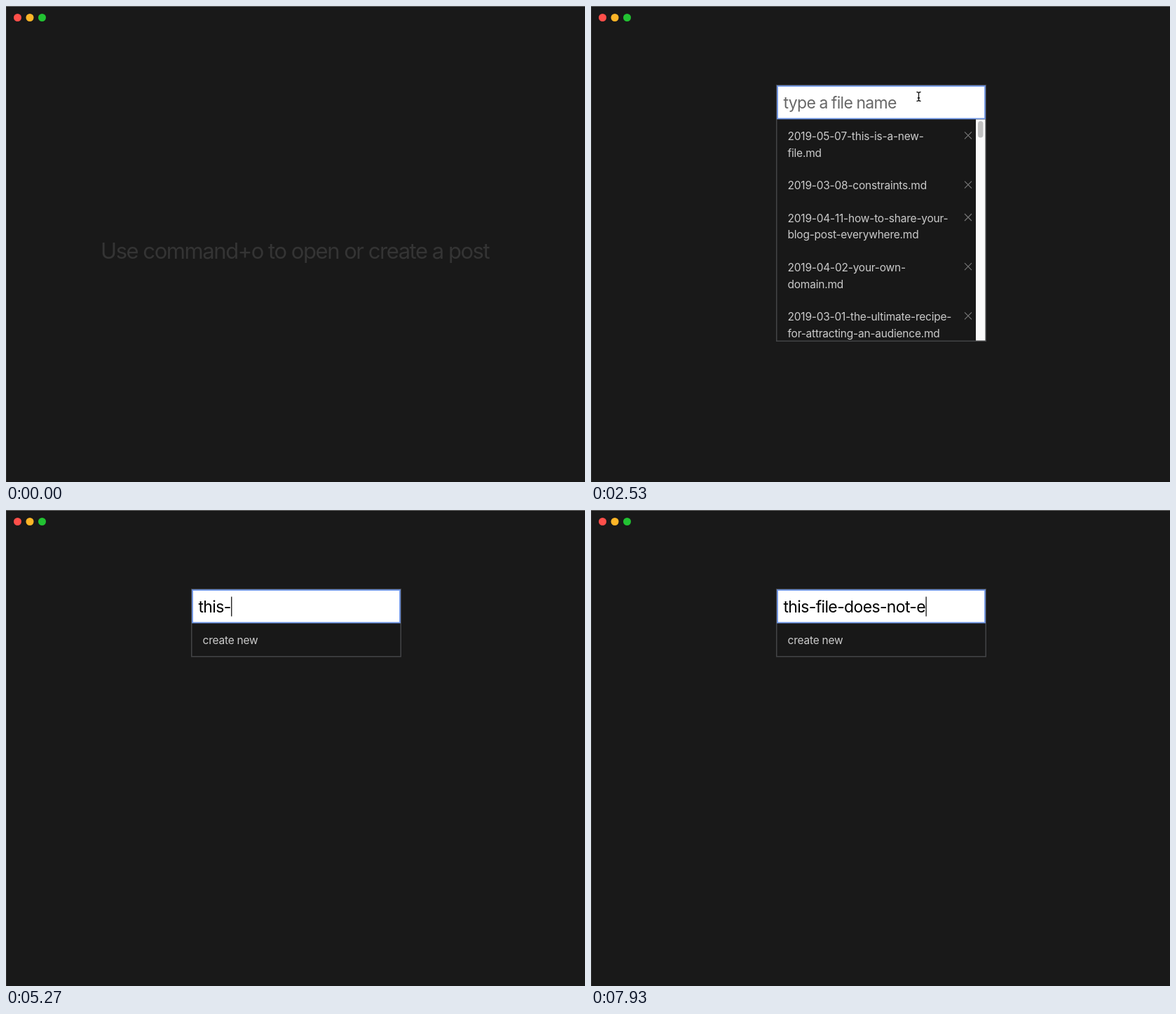
Write an HTML page that moves like this. It is 826 px wide and 678 px high and loops after 8000 ms.

```html
<!DOCTYPE html>
<html lang="en">
<head>
<meta charset="utf-8">
<title>Open or create a post</title>
<style>
  html, body { margin: 0; width: 100%; height: 100%; overflow: hidden; background: #191919; }
  svg { display: block; width: 826px; height: 678px; }
  text {
    font-family: Inter, "Noto Sans", sans-serif;
    font-optical-sizing: none;
    white-space: pre;
  }
  .hint { font-size: 31px; letter-spacing: -1.42px; word-spacing: -.2px; fill: #343434; }
  .field { font-size: 23px; letter-spacing: -.65px; word-spacing: -.7px; }
  .row { font-size: 15.5px; letter-spacing: -.22px; fill: #cbcbcb; }
  .close { stroke: #777; stroke-width: 1.1; fill: none; }
  [hidden] { display: none; }
</style>
</head>
<body>
<svg viewBox="0 0 826 678">
  <defs>
    <path id="x" d="M-5 -5L5 5M5 -5L-5 5"/>
    <path id="beam" d="M-3 -6.5Q0 -6.5 0 -4.5Q0 -6.5 3 -6.5M0 -5V5M-3 6.5Q0 6.5 0 4.5Q0 6.5 3 6.5M-1.7 2H1.7"/>
    <clipPath id="view"><rect x="265" y="161" width="298" height="315.5"/></clipPath>
  </defs>

  <rect width="826" height="678" fill="#191919"/>
  <rect width="1" height="678" fill="#303030"/>
  <rect width="826" height="1" fill="#686868"/>
  <circle cx="16.5" cy="16.5" r="5.5" fill="#ff4f4a"/>
  <circle cx="34" cy="16.5" r="5.5" fill="#fdb527"/>
  <circle cx="51.5" cy="16.5" r="5.5" fill="#22c232"/>

  <text id="hint" class="hint" x="135" y="360">Use command+o to open or create a post</text>

  <g id="dialog" hidden>
    <rect id="frame" x="264.75" y="112.75" width="298.5" height="364.5" fill="#181818" stroke="#434446" stroke-width="1.5"/>
    <rect x="266" y="114" width="296" height="46.5" fill="#fff" stroke="#6f96e6" stroke-width="1.8"/>
    <text id="field" class="field" x="274.5" y="146.3"></text>
    <rect id="caret" y="123.5" width="1.2" height="28"/>

    <g id="all" clip-path="url(#view)">
      <g id="rows"></g>
      <rect x="549" y="161.5" width="13.5" height="316" fill="#fafafa"/>
      <rect x="552" y="164" width="7.5" height="23.5" rx="3.75" fill="#c1c1c1"/>
    </g>
    <g id="match">
      <text class="row" x="280.5" y="191">2019-05-07-this-is-a-new-file.md</text>
      <use href="#x" class="close" x="551" y="184.5"/>
    </g>
    <text id="create" class="row" x="280.5" y="191">create new</text>
  </g>

  <g id="mouse" fill="none" hidden>
    <use href="#beam" stroke="#fff" stroke-width="3"/>
    <use href="#beam" stroke="#111" stroke-width="1.3"/>
  </g>
</svg>

<script>
(() => {
  const LOOP = 8000, OPEN = 1070, TYPE = 4000, CREATE = 4870;
  const $ = id => document.getElementById(id);
  const show = (id, on) => $(id).toggleAttribute('hidden', !on);

  // Time of each key press and the number of letters typed by then
  const fullName = 'this-file-does-not-e';
  const presses = [
    [4000, 1], [4070, 2], [4200, 3], [4400, 4], [4870, 5],
    [5470, 7], [5530, 9], [5670, 10], [6000, 11], [6130, 12],
    [6270, 13], [6400, 14], [6770, 15], [7270, 16], [7400, 17],
    [7530, 18], [7670, 19], [7870, 20]
  ];

  const files = [
    ['2019-05-07-this-is-a-new-', 'file.md'],
    ['2019-03-08-constraints.md'],
    ['2019-04-11-how-to-share-your-', 'blog-post-everywhere.md'],
    ['2019-04-02-your-own-', 'domain.md'],
    ['2019-03-01-the-ultimate-recipe-', 'for-attracting-an-audience.md']
  ];

  let baseline = 191, markup = '';
  for (const lines of files) {
    lines.forEach((line, i) => {
      markup += `<text class="row" x="280.5" y="${baseline + i * 23.8}">${line}</text>`;
    });
    markup += `<use href="#x" class="close" x="538" y="${baseline - 6.6}"/>`;
    baseline += lines.length * 23.8 + 22.6;
  }
  $('rows').innerHTML = markup;

  function render(t) {
    const opened = t >= OPEN, typing = t >= TYPE, creating = t >= CREATE;
    show('hint', !opened);
    show('dialog', opened);
    show('all', !typing);
    show('match', typing && !creating);
    show('create', creating);
    $('frame').setAttribute('height', typing ? 96 : 364.5);

    const [last, count] = presses.filter(p => p[0] <= t).pop() || [1030, 0];
    const field = $('field');
    field.textContent = count ? fullName.slice(0, count) : 'type a file name';
    field.setAttribute('fill', count ? '#000' : '#686868');
    const width = count ? field.getComputedTextLength() : 0;
    $('caret').setAttribute('x', 275 + width);
    show('caret', Math.floor((t - last) / 500) % 2 === 0);

    show('mouse', t >= 2270 && !typing);
    const p = Math.min(1, Math.max(0, (t - 3130) / 500));
    const ease = p * p * (3 - 2 * p);
    $('mouse').setAttribute('transform', `translate(${467.5 - 2.5 * ease} ${129 + 9 * ease})`);
  }

  const start = performance.now();
  function tick() {
    render((performance.now() - start) % LOOP);
    requestAnimationFrame(tick);
  }
  tick();
})();
</script>
</body>
</html>
```
